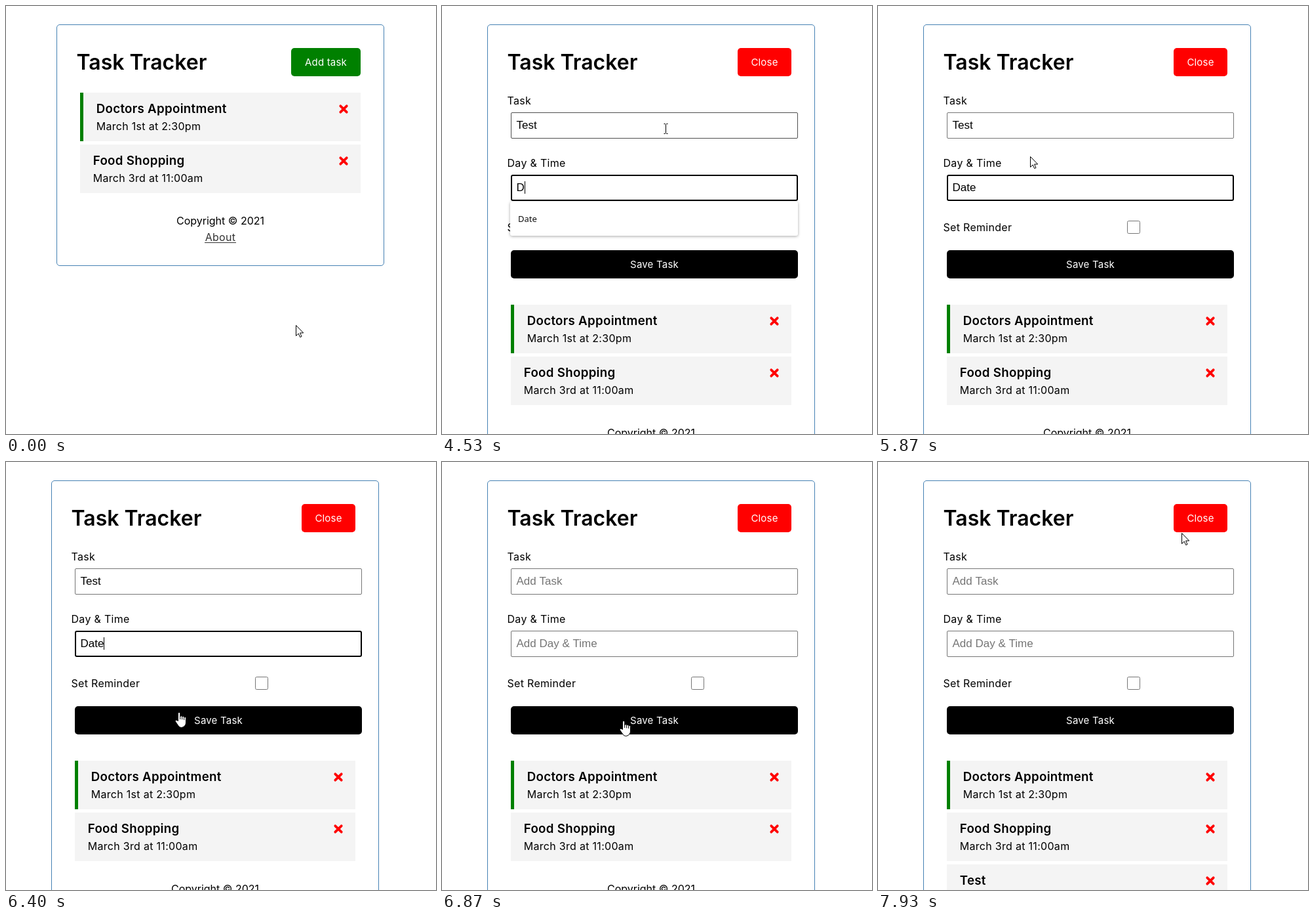
These frames come from a looping animation (656x652 px, 8000 ms). An HTML page with a canvas:

```html
<!DOCTYPE html>
<html lang="en">
<head>
<meta charset="utf-8">
<title>Task Tracker</title>
<style>
  html, body { margin: 0; height: 100%; overflow: hidden; background: #fff; }
  canvas { display: block; }
</style>
</head>
<body>
<canvas id="stage" width="656" height="652"></canvas>
<script>
const ctx = document.getElementById('stage').getContext('2d');
const LOOP = 8000, STEP = 200 / 3;
const FORM_OPENS = 4530, TYPED = 5200, PRESS = 6730, RELEASE = 6870, TASK_ADDED = 7270;

const BODY = '400 16px Inter, sans-serif';
const TITLE = '600 32px Inter, sans-serif';
const HEADING = '600 18.72px Inter, sans-serif';
const BUTTON = '400 15px Inter, sans-serif';
const FIELD = '17px "Liberation Sans", Arial, sans-serif';
const OPTION = '13px "Noto Sans", sans-serif';

const ARROW = new Path2D('M.5 .5V16.5L4.2 13 6.7 18.5 9 17.5 6.6 12H11.7Z');
const HAND = new Path2D('M-1.5 13.5V2a1.6 1.6 0 0 1 3.2 0V7a1.5 1.5 0 0 1 3 .6a1.5 1.5 0 0 1 3 1' +
  'a1.4 1.4 0 0 1 2.8 1V16q0 3-2 5.2Q6 23.5 3.5 23.5T-1 21L-5.3 14.7a1.6 1.6 0 0 1 2.3-2.2Z' +
  'M1.7 7v4M4.7 7.6v3.8M7.7 8.6V12');
const IBEAM = new Path2D('M-3-7.5H-1L0-6.5 1-7.5H3M0-6.5V6.5M-3 7.5H-1L0 6.5 1 7.5H3');

// Pointer moves: each Bezier curve begins where the one before ended.
const POINTER_START = [442, 486];
const MOVES = [
  { from: 0, to: 130, via: [[310, 360], [405, 235]] },
  { from: 4470, to: FORM_OPENS, via: [[341, 187]] },
  { from: 5800, to: 6400, via: [[-11, 300], [-11, 500], [264, 381]] },
  { from: 6400, to: 6600, via: [[277, 394]] },
  { from: 7070, to: 7130, via: [[268, 411]] },
  { from: 7200, to: 7930, via: [[430, 330], [694, -40], [463, 108]] }
];

const progress = (t, from, to) => Math.min(1, Math.max(0, (t - from) / (to - from)));
const inside = (x, y, [left, top, width, height]) =>
  x >= left && x < left + width && y >= top && y < top + height;

function bezier(points, u) {
  if (points.length === 1) return points[0];
  return bezier(points.slice(1).map(([x, y], i) => {
    const [x0, y0] = points[i];
    return [x0 + (x - x0) * u, y0 + (y - y0) * u];
  }), u);
}

const pointerAt = t => MOVES.reduce(
  (position, { from, to, via }) => bezier([position, ...via], progress(t, from, to)),
  POINTER_START
).map(Math.round);

function text(string, x, y, font, { color = '#000', align = 'left', spacing = 0 } = {}) {
  ctx.font = font;
  ctx.fillStyle = color;
  ctx.textAlign = align;
  ctx.letterSpacing = spacing + 'px';
  ctx.fillText(string, x, y);
}

function box(x, y, width, height, radius, fill) {
  ctx.beginPath();
  ctx.roundRect(x, y, width, height, radius);
  ctx.fillStyle = fill;
  ctx.fill();
}

function outline(x, y, width, height, radius, color, line = 1) {
  ctx.beginPath();
  ctx.roundRect(x + line / 2, y + line / 2, width - line, height - line, radius);
  ctx.strokeStyle = color;
  ctx.lineWidth = line;
  ctx.stroke();
}

function scaled(cx, cy, scale, draw) {
  ctx.save();
  ctx.translate(cx, cy);
  ctx.scale(scale, scale);
  ctx.translate(-cx, -cy);
  draw();
  ctx.restore();
}

const label = (string, x, y) => text(string, x, y, BODY, { spacing: .3 });

function button(string, [x, y, width, height], color) {
  box(x, y, width, height, 5, color);
  text(string, x + width / 2, y + 27, BUTTON, { color: '#fff', align: 'center', spacing: .2 });
}

function card(left, height, buttonText, buttonBox, color) {
  outline(left, 28, 500, height, 4.5, 'steelblue');
  text('Task Tracker', left + 30.5, 97, TITLE);
  button(buttonText, buttonBox, color);
}

function cross(x, y) {
  ctx.beginPath();
  for (const slope of [-1, 1]) {
    ctx.moveTo(x - 4.7, y - 4.7 * slope);
    ctx.lineTo(x + 4.7, y + 4.7 * slope);
  }
  ctx.lineCap = 'round';
  ctx.strokeStyle = 'red';
  ctx.lineWidth = 3.8;
  ctx.stroke();
  ctx.lineCap = 'butt';
}

function task({ title, when, reminder }, x, y) {
  box(x, y, 428, 74, 0, '#f4f4f4');
  if (reminder) box(x, y, 5, 74, 0, 'green');
  const textX = x + (reminder ? 24.7 : 19.7);
  text(title, textX, y + 31, HEADING, { spacing: .3 });
  label(when, textX, y + 57);
  cross(x + 402, y + 25);
}

const TASKS = [
  { title: 'Doctors Appointment', when: 'March 1st at 2:30pm', reminder: true },
  { title: 'Food Shopping', when: 'March 3rd at 11:00am' },
  { title: 'Test', when: 'Date' }
];

function taskList(x, y, count) {
  TASKS.slice(0, count).forEach((item, i) => task(item, x, y + 79 * i));
  const base = y + 79 * count + 43, middle = x + 214;
  text('Copyright © 2021', middle, base, BODY, { align: 'center' });
  text('About', middle, base + 25, BODY, { color: '#333', align: 'center', spacing: .3 });
  box(middle - 24, base + 27, 48, 1, 0, '#333');
}

function field([x, y, width, height], value, placeholder, { focused, hovered, caret }) {
  box(x, y, width, height, 2, '#fff');
  if (focused) outline(x, y, width, height, 2, '#000', 2);
  else outline(x, y, width, height, 1.5, hovered ? '#4f4f4f' : '#767676');
  text(value || placeholder, x + 8.5, y + 25, FIELD, { color: value ? '#000' : '#757575' });
  if (caret) box(Math.round(x + 8.5 + ctx.measureText(value).width), y + 10, 1, 19, 0, '#000');
}

function suggestion(fade) {
  if (fade === 1) return;
  scaled(323.5, 324, 1 - .04 * fade, () => {
    ctx.globalAlpha = 1 - fade;
    ctx.shadowColor = 'rgba(0,0,0,.35)';
    ctx.shadowBlur = 4;
    ctx.shadowOffsetY = 1;
    box(104, 298, 439, 52, 3, '#fff');
    ctx.shadowColor = 'transparent';
    text('Date', 116, 329, OPTION, { color: '#111' });
  });
}

function pointer(path, x, y) {
  ctx.save();
  ctx.translate(x, y);
  ctx.lineWidth = 1;
  ctx.strokeStyle = '#000';
  ctx.fillStyle = '#fff';
  if (path !== IBEAM) ctx.fill(path);
  ctx.stroke(path);
  ctx.restore();
}

const ADD = [435, 64, 106, 43], CLOSE = [451, 64, 82, 43], SAVE = [105, 372, 438, 43];
const TASK_INPUT = [105, 162, 438, 40], DATE_INPUT = [105, 257, 438, 40];

function listView(x, y) {
  card(77, 368, 'Add task', ADD, 'green');
  taskList(113, 132, 2);
  const clickable = [ADD, [113, 132, 428, 74], [113, 211, 428, 74]];
  pointer(clickable.some(area => inside(x, y, area)) ? HAND : ARROW, x, y);
}

function formView(t, x, y) {
  const over = area => inside(x, y, area);
  const saved = t >= RELEASE;
  const focused = t < PRESS;
  const letters = 1 + Math.floor((t - FORM_OPENS + 30) / 225);
  const caret = focused && (t < TYPED || Math.floor((t - TYPED) / 510) % 2 === 0);

  card(69, 700, 'Close', CLOSE, 'red');
  label('Task', 99.5, 150);
  label('Day & Time', 99.5, 245);
  label('Set Reminder', 99.5, 343);
  outline(380, 327, 20, 20, 2, '#767676');
  scaled(324, 393.5, focused || saved ? 1 : .98, () => button('Save Task', SAVE, '#000'));
  suggestion(progress(t, 5170, 5400));
  field(TASK_INPUT, saved ? '' : 'Test', 'Add Task', { hovered: over(TASK_INPUT) });
  field(DATE_INPUT, saved ? '' : 'Date'.slice(0, letters), 'Add Day & Time',
    { focused, caret, hovered: over(DATE_INPUT) });
  taskList(105, 455, t < TASK_ADDED ? 2 : 3);

  const path = [TASK_INPUT, DATE_INPUT].some(over) ? IBEAM
    : [SAVE, CLOSE].some(over) ? HAND : ARROW;
  pointer(path, path === IBEAM ? x + .5 : x, y);
}

function render(now) {
  // The picture advances 15 times a second, on times rounded to 10 ms.
  const t = Math.round(Math.floor((now % LOOP + 5) / STEP) * STEP / 10) * 10 % LOOP;
  const [x, y] = pointerAt(t);
  ctx.fillStyle = '#fff';
  ctx.fillRect(0, 0, 656, 652);
  if (t < FORM_OPENS) listView(x, y);
  else formView(t, x, y);
}

const start = performance.now();
function tick() {
  render(performance.now() - start);
  requestAnimationFrame(tick);
}
tick();
</script>
</body>
</html>
```
